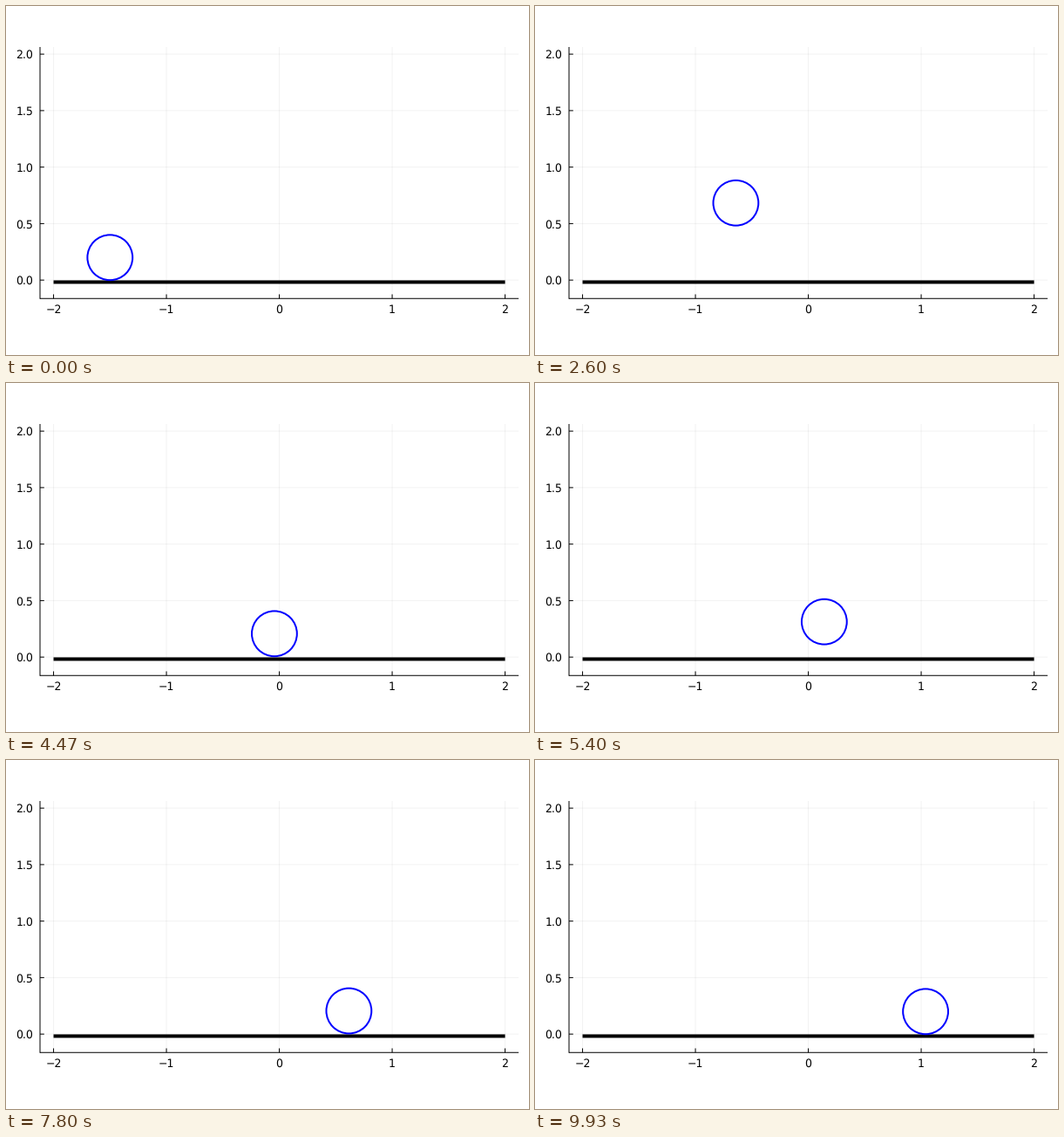
A matplotlib script that plays this animation: 600x400 px, repeating every 9990 ms.

```python
import matplotlib.pyplot as plt
from matplotlib.animation import FuncAnimation
from matplotlib.patches import Circle, Rectangle

W, H, DPI = 600, 400, 100
PX = 72 / DPI                        # one pixel in points
UNIT = 129.5                         # pixels per data unit
X0, Y0 = 313.55, 314.15              # pixel position of the data origin
FRAMES, LOOP_MS = 150, 9990

RADIUS = 0.2
DT, GRAVITY = 0.01, 9.8
BOUNCE, GRIP = 0.5, 0.6              # speed kept: vertical, horizontal

plt.rcParams["font.family"] = "DejaVu Sans"
plt.rcParams["text.hinting"] = "none"


def px(x):
    return X0 + UNIT * x


def py(y):
    return Y0 - UNIT * y


def simulate(steps):
    """Euler steps of a thrown ball that starts to roll at its first bounce."""
    x, y, vx, vy = -1.5, RADIUS, 2.2, 3.1
    rolling = False
    path = [(x, y)]
    for _ in range(steps - 1):
        x += vx * DT
        y += vy * DT
        if y < RADIUS and vy <= 0:
            # impacts weaker than one step of gravity bring the ball to rest
            vy = -BOUNCE * vy if -vy > GRAVITY * DT else 0
            if not rolling:
                vx *= GRIP
                rolling = True
        else:
            vy -= GRAVITY * DT
        path.append((x, y))
    return path


fig = plt.figure(figsize=(W / DPI, H / DPI), dpi=DPI, facecolor="white")
ax = fig.add_axes([0, 0, 1, 1])
ax.set_xlim(0, W)
ax.set_ylim(H, 0)
ax.axis("off")

LEFT, RIGHT = px(-2.12), px(2.12)
BOTTOM, TOP = py(-0.163), py(2.063)
TICK = 4.8


def line(xs, ys, **style):
    ax.plot(xs, ys, color="black", lw=PX, solid_capstyle="butt",
            snap=False, **style)


def label(x, y, text, align):
    ax.text(x, y, text, size=9, ha=align, va="baseline", color="black")


for v in range(-2, 3):
    x = px(v)
    line([x, x], [TOP, BOTTOM], alpha=0.05, zorder=1)
    line([x, x], [BOTTOM, BOTTOM - TICK], zorder=2)
    label(x, 352, str(v).replace("-", "\u2212"), "center")

for i in range(5):
    y = py(i / 2)
    line([LEFT, RIGHT], [y, y], alpha=0.05, zorder=1)
    line([LEFT, LEFT + TICK], [y, y], zorder=2)
    label(31.3, y + 5.1, f"{i / 2:.1f}", "right")

line([LEFT, LEFT], [TOP, BOTTOM + 0.5], zorder=2)
line([LEFT, RIGHT], [BOTTOM, BOTTOM], zorder=2)

ax.add_patch(Rectangle((px(-2), Y0 + 0.3), 4 * UNIT, 4, fc="black",
                       ec="none", snap=False, zorder=3))

path = simulate(FRAMES)
ball = Circle((px(path[0][0]), py(path[0][1])), RADIUS * UNIT,
              fill=False, ec="#0000ff", lw=2 * PX, zorder=4)
ax.add_patch(ball)


def update(i):
    x, y = path[i]
    ball.center = px(x), py(y)
    return (ball,)


anim = FuncAnimation(fig, update, frames=FRAMES, interval=LOOP_MS / FRAMES,
                     repeat=True, repeat_delay=0)
plt.show()
```
